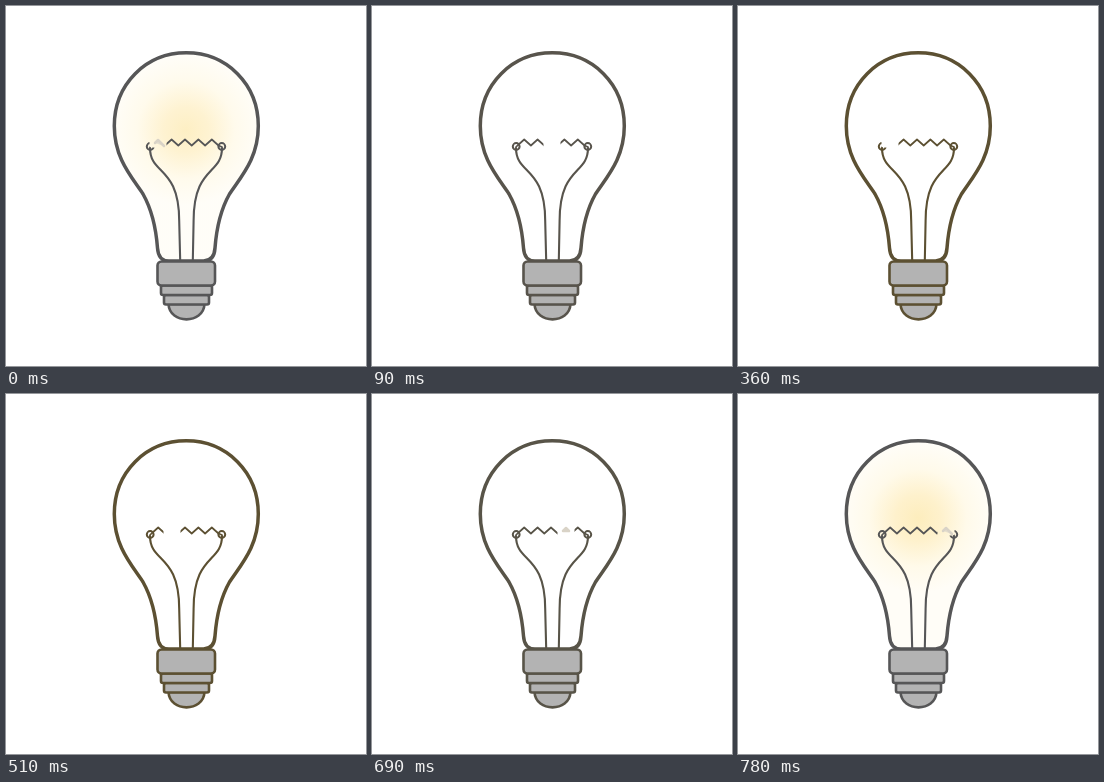
An HTML page for the animation above (810 ms loop, 360 by 360 pixels).

```html
<!DOCTYPE html>
<html lang="en">
<head>
<meta charset="utf-8">
<title>Light bulb</title>
<style>
  html, body { margin: 0; width: 100%; height: 100%; overflow: hidden; background: #fff; }
  svg { display: block; width: 100vw; height: 100vh; }
</style>
</head>
<body>
<svg viewBox="0 0 360 360" fill="none" stroke-linecap="round" stroke-linejoin="round">
  <defs>
    <radialGradient id="light" gradientUnits="userSpaceOnUse" cx="180" cy="124" r="75">
      <stop offset="0" stop-color="#fdedbd"/>
      <stop offset=".3" stop-color="#fef1cc"/>
      <stop offset=".65" stop-color="#fffaea"/>
      <stop offset="1" stop-color="#fffdf7"/>
    </radialGradient>
    <mask id="cut" maskUnits="userSpaceOnUse" x="0" y="0" width="360" height="360">
      <path d="M0 0H360V360H0Z" fill="#fff"/>
      <rect id="gap" y="128" width="17" height="13.500" fill="#000"/>
    </mask>
    <path id="glass" d="M163 255C155 255 152 250 151.500 242C150 222 146 204 137 188C125 170 108.300 152 108.300 120C108.300 78 140 46.800 180.300 46.800S252.300 78 252.300 120C252.300 152 235.500 170 223.500 188C214.500 204 210.500 222 209 242C208.500 250 205.500 255 197.500 255Z"/>
  </defs>
  <use id="glow" href="#glass" fill="url(#light)"/>
  <g id="lines">
    <use href="#glass" stroke-width="3.500"/>
    <path d="M144 142C144 169 173.200 160 173.200 215L174.200 255M216 142C216 169 187.600 160 187.600 215L186.800 255" stroke-width="2.100"/>
    <g mask="url(#cut)" stroke-width="1.700">
      <path id="filament"/>
      <circle cx="144.200" cy="140.500" r="3.400" stroke-width="2"/>
      <circle cx="215.800" cy="140.500" r="3.400" stroke-width="2"/>
    </g>
    <g fill="#b3b3b3" stroke-width="2.600">
      <path d="M162.500 298H198.500C197.500 318.500 163.500 318.500 162.500 298Z"/>
      <rect x="158" y="289" width="45" height="9.500" rx="2"/>
      <rect x="155" y="279.500" width="51" height="9.500" rx="2"/>
      <rect x="151.500" y="255.500" width="57.500" height="24" rx="4"/>
    </g>
  </g>
  <path id="spark" stroke="#d9d3c7" fill="#e4dece" stroke-width="2.500"/>
</svg>
<script>
  const STEP = 30, FRAMES = 27, TEETH = 5, DWELL = 3;
  const $ = id => document.getElementById(id);
  const tooth = 13.4, left = 145.5;

  let zigzag = `M144 141L${left} 139.500`;
  for (let i = 0; i < TEETH; i++) zigzag += `l${tooth / 2} -6l${tooth / 2} 6`;
  $('filament').setAttribute('d', zigzag + 'L216 141');

  // Light swells at the end of the second pass and dies at the loop start.
  const glowAt = f => f > 12 ? Math.max(0, (f - 23) / 3) : Math.max(0, 0.9 - f * 0.45);
  const mix = (a, b, k) => a + (b - a) * k;

  function draw(now) {
    const frame = Math.floor(now / STEP) % FRAMES;
    const index = frame ? Math.floor(frame / DWELL + 1) % TEETH : 0;
    const center = 180 + 14 * (index - 2);
    const glow = glowAt(frame);
    const cool = Math.max(glow, 1 - Math.min(frame, FRAMES - frame) / 10, 0);
    $('gap').setAttribute('x', center - 8.5);
    $('glow').setAttribute('opacity', glow);
    $('lines').setAttribute('stroke',
      `rgb(${mix(92, 86, cool)},${mix(80, 86, cool)},${mix(50, 87, cool)})`);
    $('spark').setAttribute('d', `M${center - 3} 137l3 -3l3 3` + (glow ? 'l3 3' : 'z'));
    $('spark').setAttribute('opacity', frame >= 23 || frame < 2 ? 1 : 0);
    requestAnimationFrame(() => draw(performance.now()));
  }
  draw(0);
</script>
</body>
</html>
```
